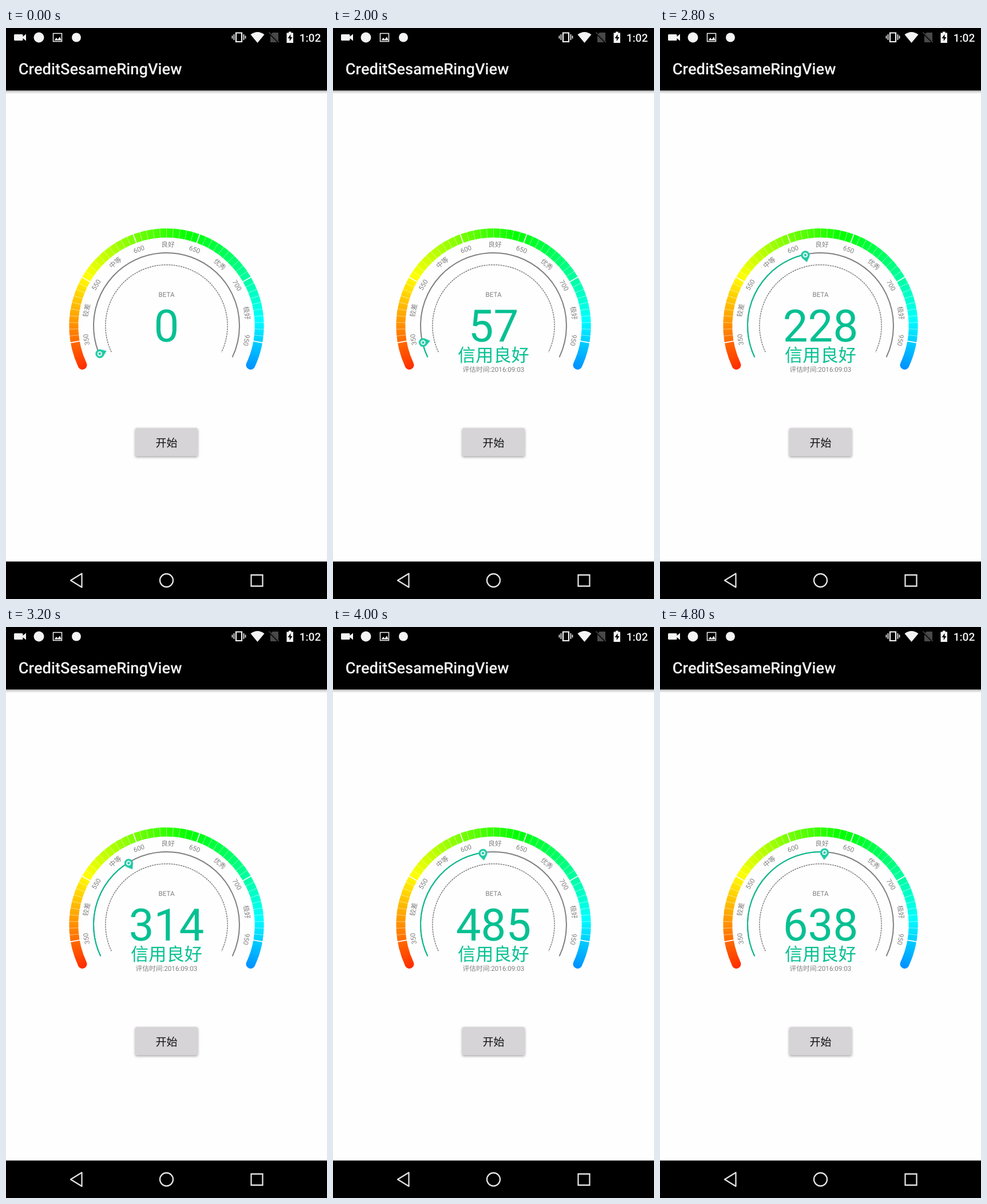
An HTML page with a canvas that plays this animation: 561x998 px, repeating every 4.9 s.

```html
<!DOCTYPE html>
<html lang="zh-CN">
<head>
<meta charset="utf-8">
<style>
html, body { margin: 0; width: 100%; height: 100%; overflow: hidden; background: #fefefe; }
canvas { display: block; }
</style>
</head>
<body>
<canvas id="stage" width="561" height="998"></canvas>
<script>
const ctx = document.getElementById('stage').getContext('2d');
ctx.textRendering = 'geometricPrecision';
const LOOP = 4900, STEP = 100, START = 1733.6, DURATION = 3000, SPEED = 1.008;
const SCORE = 638, CX = 280.5, CY = 520.5;
const GREY = '#808080', GREEN = '#06c092', ICON = '#f4f4f4', NAV = '#e2e2e2';
const FONT = 'Roboto, "Noto Sans CJK SC", "Noto Sans CJK", sans-serif';
const rad = deg => deg * Math.PI / 180;

function text(str, x, y, size, color, align = 'center', weight = 400) {
  ctx.font = `${weight} ${size}px ${FONT}`;
  ctx.textAlign = align;
  ctx.fillStyle = color;
  ctx.fillText(str, x, y);
}

function rect(x, y, w, h, color) {
  ctx.fillStyle = color;
  ctx.fillRect(x, y, w, h);
}

function disc(x, y, r, color) {
  ctx.beginPath();
  ctx.arc(x, y, r, 0, 2 * Math.PI);
  ctx.fillStyle = color;
  ctx.fill();
}

function shape(d, color, lineWidth) {
  const path = new Path2D(d);
  if (lineWidth) {
    ctx.strokeStyle = color;
    ctx.lineWidth = lineWidth;
    ctx.stroke(path);
  } else {
    ctx.fillStyle = color;
    ctx.fill(path);
  }
}

// Gauge angles run clockwise in degrees; 0 points left, 90 points up.
function arc(r, from, to, color, width) {
  ctx.beginPath();
  ctx.arc(CX, CY, r, rad(180 + from), rad(180 + to));
  ctx.strokeStyle = color;
  ctx.lineWidth = width;
  ctx.stroke();
}

// Runs draw() with the origin on the gauge and "up" pointing outwards.
function onGauge(angle, r, draw) {
  ctx.save();
  ctx.translate(CX, CY);
  ctx.rotate(rad(angle - 90));
  ctx.translate(0, -r);
  draw();
  ctx.restore();
}

function bounce(p) {
  const t = p * 1.1226, hop = (mid, base) => 8 * (t - mid) ** 2 + base;
  if (t < 0.3535) return hop(0, 0);
  if (t < 0.7408) return hop(0.54719, 0.7);
  if (t < 0.9644) return hop(0.8526, 0.9);
  return Math.min(1, hop(1.0435, 0.95));
}

function statusBar() {
  const shade = ctx.createLinearGradient(0, 109, 0, 115);
  shade.addColorStop(0, 'rgba(0,0,0,.28)');
  shade.addColorStop(1, 'rgba(0,0,0,0)');
  rect(0, 109, 561, 6, shade);
  rect(0, 0, 561, 109.2, '#000');
  text('CreditSesameRingView', 21.8, 80.5, 27.27, ICON, 'left', 500);
  text('1:02', 550.3, 23.8, 19.1, ICON, 'right', 500);

  shape('M15.5 11H28q1.5 0 1.5 1.5V15l5.5-4.5v12L29.5 18v2.5q0 1.5-1.5 1.5H15.5q-1.5 0-1.5-1.5v-8q0-1.5 1.5-1.5z', ICON);
  disc(57.5, 16.5, 9, ICON);
  shape('M82.5 9.5h15v14h-15z', ICON, 1.5);
  shape('M84.5 21.5l3.5-4.5 2.5 3 3.5-4.5 3 6z', ICON);
  disc(123, 16.5, 8, ICON);

  shape('M402 8.5h10v15.5h-10z', ICON, 2.2);
  shape('M398.5 11v10M395.5 13.5v5M415.5 11v10M418.5 13.5v5', ICON, 1.7);
  shape('M427.5 11.5Q439.5 2.5 451.5 11.5L439.5 26z', ICON);
  shape('M466 8h10v17h-14V12z', '#494949');
  shape('M459.5 8.5l17.5 17.5', '#000', 3);
  shape('M459.5 7.5l17.5 17.5', '#494949', 1.5);
  shape('M494 6.5h4.5v2h3.5V26h-11.5V8.5h3.5z', ICON);
  shape('M497.5 11l-5 7h3.2v5l4.8-7h-3z', '#000');
}

function navBar() {
  rect(0, 932.5, 561, 66, '#000');
  ctx.lineJoin = 'round';
  shape('M113 965.5L132.5 953.5V977.5z', NAV, 2.3);
  ctx.lineJoin = 'miter';
  ctx.beginPath();
  ctx.arc(280.5, 965.5, 11.5, 0, 2 * Math.PI);
  ctx.stroke();
  shape('M428.5 956h20v19.5h-20z', NAV, 2.3);
}

function button() {
  ctx.save();
  ctx.shadowColor = 'rgba(0,0,0,.38)';
  ctx.shadowBlur = 4;
  ctx.shadowOffsetY = 1.5;
  ctx.beginPath();
  ctx.roundRect(226, 699.3, 109, 49.3, 2.7);
  ctx.fillStyle = '#d6d4d7';
  ctx.fill();
  ctx.restore();
  text('开始', 280.5, 731.5, 19.1, '#111');
}

const sweep = ctx.createConicGradient(rad(140), CX, CY);
['#f00', '#ff0', '#0f0', '#0ff', '#00f', '#f00'].forEach((c, i) => sweep.addColorStop(i / 5, c));

function dial() {
  ctx.lineCap = 'round';
  arc(162.2, -25, 205, sweep, 16);
  ctx.lineCap = 'butt';
  for (let a = -10; a <= 190; a += 4) {
    const major = (a + 10) % 40 === 0;
    onGauge(a, 162.2, () => shape('M0-8.5V8.5', major ? '#fff' : 'rgba(255,255,255,.6)', major ? 1.7 : 0.8));
  }
  '350 较差 550 中等 600 良好 650 优秀 700 极好 950'.split(' ').forEach((label, i) => {
    const shift = i % 2 ? 1 : 0.2;
    onGauge(-10 + 20 * i + shift, 142.2, () => text(label, 0, 4.2, 11.7, GREY));
  });
  arc(127.5, -25.5, 205.5, GREY, 2);
  ctx.setLineDash([3, 1.2]);
  arc(106.6, -25.5, 205.5, GREY, 1.5);
  ctx.setLineDash([]);
  text('BETA', CX, 470, 11.7, GREY);
}

function pin() {
  ctx.save();
  ctx.shadowColor = 'rgba(30,205,170,.6)';
  ctx.shadowBlur = 2;
  shape('M0 12.5L-6.2 4.2A7.4 7.4 0 1 1 6.2 4.2z', '#20c8a4');
  ctx.restore();
  disc(0, 0, 4.4, '#d5f5ed');
  disc(0, 0, 2, '#20c8a4');
}

function draw(time) {
  const tick = Math.floor(time % LOOP / STEP) * STEP;
  const p = Math.min(1, Math.max(0, (tick - START) * SPEED / DURATION));
  const angle = -22.7 + 115.9 * bounce(p);

  rect(0, 0, 561, 998, '#fefefe');
  statusBar();
  navBar();
  button();
  dial();
  if (p > 0) {
    arc(127.5, -25.5, angle, GREEN, 2);
    text('信用良好', CX, 583, 31.2, GREEN);
    text('评估时间:2016:09:03', CX, 600.5, 11.7, GREY);
  }
  text(Math.floor(SCORE * p), CX, 548.3, 78, GREEN);
  onGauge(angle, 126.5, pin);
}

const origin = performance.now();
function frame() {
  draw(performance.now() - origin);
  requestAnimationFrame(frame);
}
frame();
</script>
</body>
</html>
```
